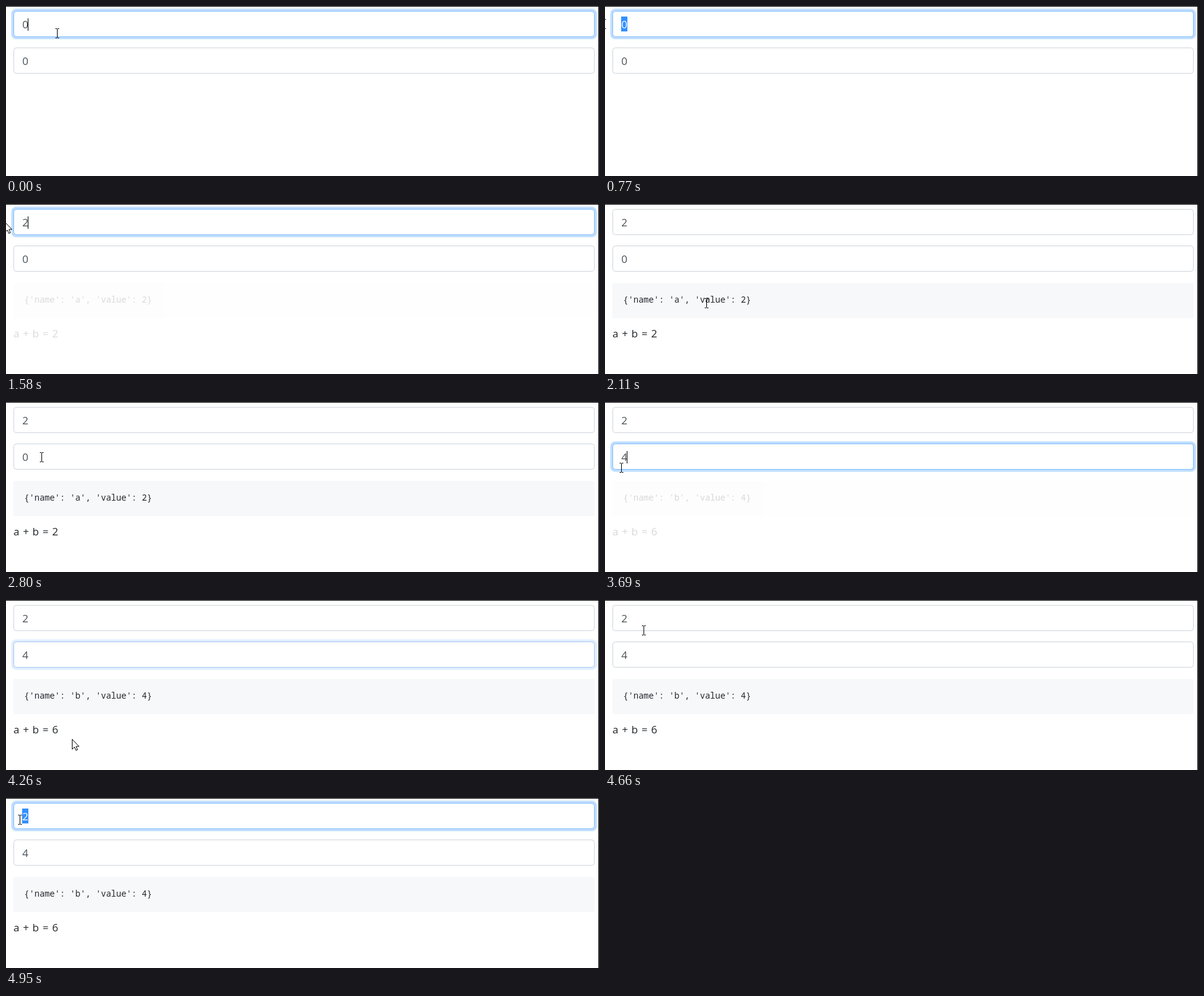
Animation of 954 by 274 pixels, one loop 5030 ms. Source, as an HTML page:

```html
<!DOCTYPE html>
<html lang="en">
<head>
<meta charset="utf-8">
<title>Two inputs and their sum</title>
<style>
  html, body { margin: 0; width: 100%; height: 100%; overflow: hidden; background: #fff; }
  svg { display: block; }
  .ui { font: 17px "Open Sans", "Noto Sans", sans-serif; word-spacing: 1.3px; fill: #212529; }
  .code { font: 13.72px "Noto Sans Mono", "DejaVu Sans Mono", monospace; fill: #24292e; white-space: pre; }
  .value { fill: #495057; }
  .selected .value { fill: #fff; }
  .mark { fill: #3390ff; visibility: hidden; }
  .selected .mark { visibility: visible; }
</style>
</head>
<body>
<svg id="stage" width="954" height="274" viewBox="0 0 954 274">
  <rect width="954" height="1"/>
  <rect x="953" width="1" height="274"/>
  <g id="fields"></g>
  <g id="output">
    <rect x="12" y="127" width="935" height="57" rx="3" fill="#f6f8fa"/>
    <text id="event" class="code" x="29.2" y="159"></text>
    <text id="sum" class="ui" x="12" y="215"></text>
  </g>
  <g id="pointer">
    <path id="beam" fill="none" stroke="#000" d="M-3-7.5h2.5m1 0h2.5M-3 7.5h2.5m1 0h2.5M0-7V7"/>
    <path id="arrow" fill="#fff" stroke="#000" stroke-linejoin="round"
      d="M.5.5V16.5L4.2 13L6.6 18.4L9.1 17.3L6.7 12H11.5Z"/>
  </g>
</svg>
<script>
const LOOP = 5030, FADE = 400, FOCUS = 150;
const $ = id => document.getElementById(id);
const clamp = v => Math.min(1, Math.max(0, v));
const swing = v => 0.5 - Math.cos(Math.PI * clamp(v)) / 2;
const within = (t, spans) => spans.some(([from, to]) => t >= from && t < to);

// Time spans in ms for each input.
const fields = [
  { y: 0, typed: 1300, digit: 2,
    focus: [[-FOCUS, 1790], [4690, LOOP]],
    caret: [[0, 640], [1300, 1790], [4690, 4850]],
    select: [[640, 1300], [4850, LOOP]] },
  { y: 59, typed: 3410, digit: 4,
    focus: [[3030, 4185]],
    caret: [[3030, 3270], [3410, 3940]],
    select: [[3270, 3410]] }
];

// Pointer stops: time, x, y, shape.
const path = [
  [0, 82.5, 44, "beam"],
  [440, 82.5, 44, "beam"],
  [770, -2, 29, "beam"],
  [1300, -2, 29, "arrow"],
  [1600, -2, 29, "arrow"],
  [1790, 30, 160, "arrow"],
  [1950, 46, 196, "arrow"],
  [1990, 48, 196, "arrow"],
  [2070, 125, 173, "beam"],
  [2110, 162.5, 161, "beam"],
  [2160, 195, 141, "arrow"],
  [2230, 234, 117, "arrow"],
  [2350, 150, 215, "arrow"],
  [2500, 150, 215, "arrow"],
  [2700, 75, 105, "beam"],
  [2800, 57.5, 89, "beam"],
  [3000, 50.5, 91, "beam"],
  [3080, 50.5, 91, "beam"],
  [3380, 26.5, 106, "beam"],
  [3700, 26.5, 106, "beam"],
  [3780, 40, 135, "arrow"],
  [4090, 102, 219, "arrow"],
  [4140, 106, 224, "arrow"],
  [4300, 106, 224, "arrow"],
  [4570, 74, 96, "beam"],
  [4660, 62.5, 50, "beam"],
  [4720, 60.5, 48, "beam"],
  [4950, 22.5, 35, "beam"],
  [LOOP, 22.5, 35, "beam"]
];

$("fields").innerHTML = fields.map(f => `
  <g transform="translate(0 ${f.y})">
    <rect x="12.5" y="8.5" width="934" height="41" rx="4" fill="#fff" stroke="#ced4da"/>
    <g class="glow" fill="none">
      <rect x="10.25" y="6.25" width="938.5" height="45.5" rx="6" stroke="#bfdeff" stroke-width="3.5"/>
      <rect x="12.5" y="8.5" width="934" height="41" rx="4" stroke="#80bdff"/>
    </g>
    <rect class="mark" x="26" y="17" width="10" height="24"/>
    <text class="ui value" x="26.2" y="36"></text>
    <rect class="caret" x="35" y="20" width="1" height="20"/>
  </g>`).join("");

fields.forEach((f, i) => {
  f.box = $("fields").children[i];
  f.glow = f.box.querySelector(".glow");
  f.text = f.box.querySelector(".value");
  f.caret_ = f.box.querySelector(".caret");
});

function show(node, on) {
  node.style.visibility = on ? "visible" : "hidden";
}

function drawField(f, t) {
  f.glow.style.opacity = Math.max(...f.focus.map(([on, off]) =>
    swing((t - on) / FOCUS) * (1 - swing((t - off) / FOCUS))));
  f.text.textContent = t < f.typed ? 0 : f.digit;
  f.box.classList.toggle("selected", within(t, f.select));
  show(f.caret_, within(t, f.caret));
}

function drawOutput(t) {
  const second = t >= 3570;
  const [name, value, total] = second ? ["b", 4, 6] : ["a", 2, 2];
  $("event").textContent = `{'name': '${name}', 'value': ${value}}`;
  $("sum").textContent = `a + b = ${total}`;
  $("output").style.opacity = swing((t - (second ? 3580 : 1475)) / FADE);
}

function drawPointer(t) {
  const next = path.findIndex(p => p[0] > t);
  const [t0, x0, y0, shape] = path[next - 1];
  const [t1, x1, y1] = path[next];
  const k = (t - t0) / (t1 - t0);
  const snap = v => Math.floor(v) + (shape === "beam" ? 0.5 : 0);
  const x = snap(x0 + (x1 - x0) * k);
  const y = Math.floor(y0 + (y1 - y0) * k);
  $("pointer").setAttribute("transform", `translate(${x} ${y})`);
  show($("beam"), shape === "beam");
  show($("arrow"), shape === "arrow");
}

const start = performance.now();
function draw() {
  const t = (performance.now() - start) % LOOP;
  fields.forEach(f => drawField(f, t));
  drawOutput(t);
  drawPointer(t);
  requestAnimationFrame(draw);
}
draw();
</script>
</body>
</html>
```
